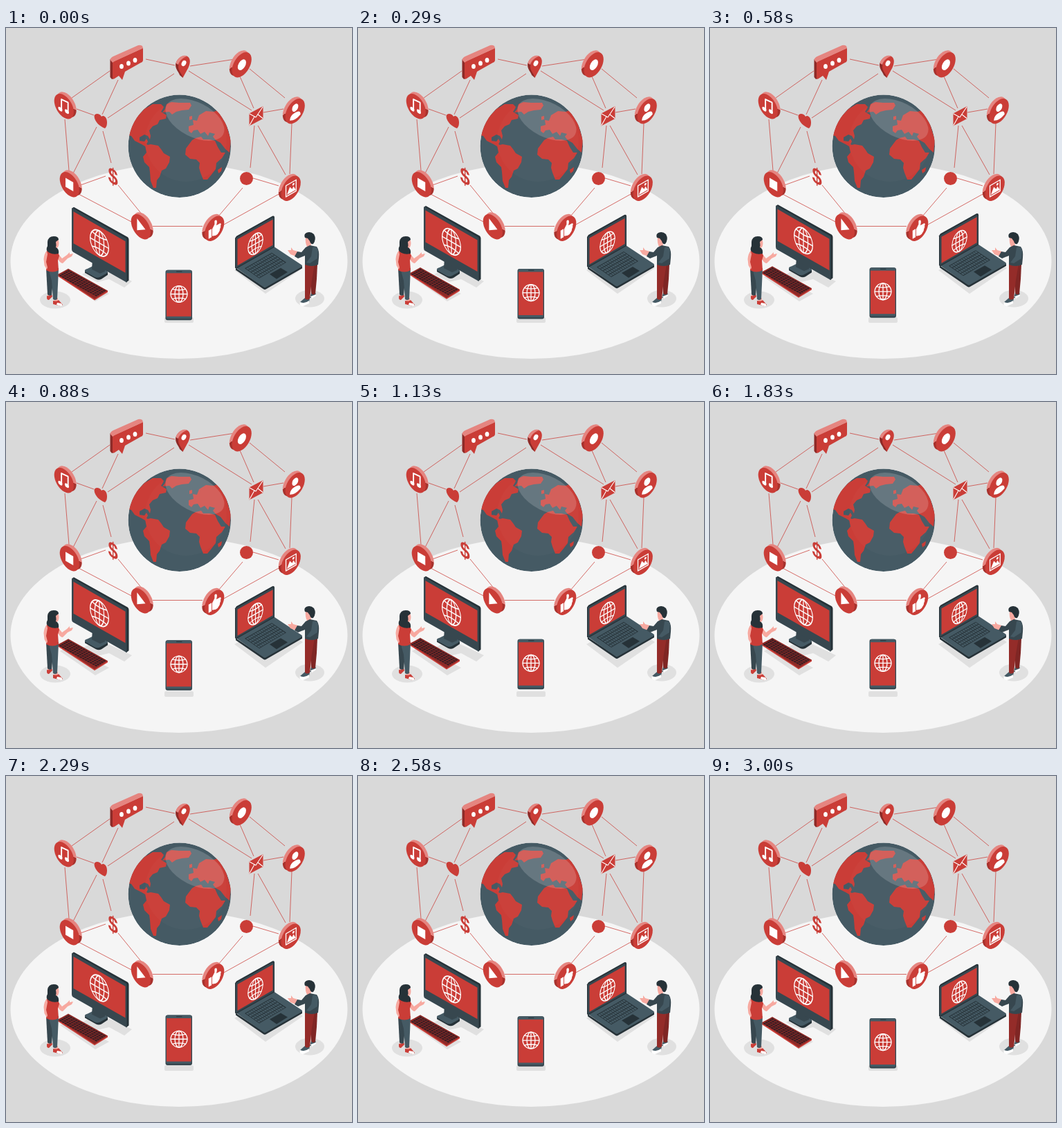
Write an HTML page that moves like this. It is 500 px wide and 500 px high and loops after 3.04 s.

```html
<!DOCTYPE html>
<html lang="en">
<head>
<meta charset="utf-8">
<title>Connected devices</title>
<style>
  html, body { margin: 0; width: 100%; height: 100%; overflow: hidden; background: #d9d9d9; }
  svg { display: block; width: 100vw; height: 100vh; }
  .red { fill: #ca3d37; }
  .deep { fill: #8e2a27; }
  .slate { fill: #455a64; }
  .dark { fill: #37474f; }
  .ink { fill: #263238; }
  .skin { fill: #f7a9a0; }
  .shade { fill: #e0e0e0; }
  .white { fill: #fff; }
  .line { fill: none; stroke: #fff; stroke-linecap: round; stroke-linejoin: round; }
</style>
</head>
<body>
<svg viewBox="0 0 500 500" xmlns="http://www.w3.org/2000/svg">
  <defs>
    <linearGradient id="rim" x1="0" y1="0" x2="0" y2="1">
      <stop offset=".5" stop-color="#e58580"/>
      <stop offset=".5" stop-color="#a8322d"/>
    </linearGradient>
    <clipPath id="ball"><circle cx="250.800" cy="170.700" r="74.200"/></clipPath>
    <g id="web" class="line">
      <circle r="10"/>
      <ellipse rx="5" ry="10"/>
      <path d="M0-10V10M-10 0H10M-8-6Q0-3.600 8-6M-8 6Q0 3.600 8 6"/>
    </g>
  </defs>

  <rect width="500" height="500" fill="#d9d9d9"/>
  <ellipse cx="250" cy="337" rx="243.500" ry="141" fill="#f5f5f5"/>

  <path fill="none" stroke="#ca3d37" stroke-width=".75" d="M202 45 244 54M266 55 331 45M264 62 355 119M243 66 147 130
    M150 62 95 101M162 75 139 125M102 117 127 126M85 132 91 206M131 143 97 210M140 149 152 195M105 228 144 214
    M103 239 183 281M162 227 197 270M212 286.500H284M307 272 342 231M315 284 396 239M357 217 394 228M353 202 359 141
    M364 141 404 212M372 122 401 117M338 70 358 116M352 59 403 101M413 138 410 211"/>

  <!-- earth -->
  <g clip-path="url(#ball)">
    <circle cx="250.800" cy="170.700" r="74.200" class="slate"/>
    <g class="red">
      <path d="M176 155 186 132 200 117 212 110 224 110 228 114 226 118 224 121 232 126 231 131 222 133 219 139 212 142 207 148 209 156 208 161
        205 156 200 154 193 158 193 163 200 164 203 160 205 164 203 168 209 171 206 174 196 168 186 163 181 156Z"/>
      <path d="M232 110 239 107 250 108 266 108 268 112 264 118 254 119 246 121 240 125 236 121 226 122 230 117Z"/>
      <path d="M201 170 209 168 220 170 224 175 228 181 237 186 236 194 231 203 225 206 222 215 218 220 217 231 213 231
        209 221 208 208 207 201 200 194 198 186 203 180Z"/>
      <path d="M264 149 264 142 271 140 270 133 276 134 279 126 289 120 300 121 306 119 318 139 325 162 323 180 317 175 310 166
        303 162 299 157 302 153 294 151 292 156 287 150 281 153 277 147 271 148 268 152Z"/>
      <path d="M269 162 274 159 282 157 285 161 294 161 302 163 306 172 311 180 317 180 312 188 304 195 303 204 296 213
        291 219 285 219 281 209 279 202 280 195 275 190 266 189 259 183 260 174Z"/>
      <path d="M306 205 312 201 311 207 307 210Z"/>
      <path d="M265 128 269 127 269 132 265 133Z"/>
    </g>
    <circle cx="260" cy="163" r="59" fill="#fff" opacity=".02"/>
    <ellipse cx="273" cy="132.500" rx="46" ry="25" transform="rotate(27 273 132.500)" fill="#fff" opacity=".16"/>
  </g>

  <!-- speech bubble -->
  <path class="deep" d="M150.500 45 154 49 156 73 153 74 150.500 71Z"/>
  <path class="red" d="M154 49 198 29V46Q198 49 195 50L172 63 168 75 163 69 157 73Q154 75 154 71Z"/>
  <path fill="#e58580" d="M150.500 46Q151 43 155 41L191 25Q194 24 197 26L198 29 157 48 154 50Z"/>
  <g class="white"><ellipse cx="167" cy="55.500" rx="2.900" ry="3.500"/><ellipse cx="177" cy="51" rx="2.900" ry="3.500"/><ellipse cx="186.500" cy="46.500" rx="2.900" ry="3.500"/></g>

  <!-- pin -->
  <path class="deep" d="M255.500 72 251 68C250 64 245 60 245 53 246 45 255 38 262 41Z"/>
  <path class="red" d="M255.500 72C255 66 249 63 249 56 249 47 257 39 262 41 269 45 265 56 261 62Z"/>
  <path fill="#e58580" d="M245.500 51C247 44 256 37 262 41 256 42 251 47 249 53Z"/>
  <ellipse class="white" cx="257" cy="51" rx="3.200" ry="4.300" transform="rotate(25 257 51)"/>

  <!-- heart, envelope, dollar, round badge -->
  <path class="red" d="M127.500 127C129 122 136 124 138 128 141 125 146 129 146 136 146 141 145 143 143 145 137 143 127.500 136 127.500 127Z"/>
  <path class="red" d="M351.500 123.500 371.500 113V131L351.500 141.500Z"/>
  <path class="line" stroke-width="1.100" d="M352 124 361 129 371 114M352 140.500 359 128M371 130.500 364 125"/>
  <text transform="matrix(.8 .46 0 1 154.500 214.500)" y="11" text-anchor="middle" class="red" font-family="Liberation Sans, Arial, sans-serif" font-weight="700" font-size="32">$</text>
  <circle class="red" cx="347.500" cy="217.500" r="9.500"/>

  <g id="discs"></g>

  <!-- ground shadows -->
  <g class="shade">
    <path d="M78 360 90 353 149 384 129 395Z"/>
    <path d="M110 356 133 343 182 366 171 375 149 363 132 367Z"/>
    <path d="M330 350 388 319 429 347 375 384Z"/>
    <rect x="229" y="418" width="42" height="8" rx="2"/>
    <ellipse cx="71" cy="393" rx="22" ry="12.500"/>
    <ellipse cx="439" cy="391" rx="21" ry="12.500"/>
  </g>

  <g id="devices">
    <!-- monitor -->
    <g transform="translate(0 2)">
      <path class="ink" d="M114 352 130 361Q134 363 138 361L147 355V351L114 349Z"/>
      <path class="slate" d="M114 350Q113 347 118 346L126 342 146 348Q148 351 145 353L136 358Q132 360 128 358Z"/>
      <path class="dark" d="M125 333 143 343V350L136 353 124 347Z"/>
    </g>
    <path class="ink" d="M95 261 98 259 176 302.500Q177.500 304 177.500 306V365L173.500 368 172 309Z"/>
    <path class="dark" d="M95 262Q95 259.500 97.500 261L173 304Q174.500 305 174.500 307V368L97 324Q95 323 95 320Z"/>
    <path class="red" d="M97.500 265.500 172.500 308.500V354L97.500 311.500Z"/>
    <use href="#web" transform="matrix(1.330 .770 0 1.760 135 311)" stroke-width=".95"/>

    <!-- keyboard -->
    <path class="red" d="M75 356 90 349 147 380V382L128 393.700 75 359Z"/>
    <path fill="#8e2a27" d="M75 356.500 90 348 147 380 128 392Z"/>
    <g id="keys" fill="#3a1d22"></g>

    <!-- laptop -->
    <path class="ink" d="M332 347 374 375 428 344V347.500L376 377.500Q374 379 372 377.500L332 350Z"/>
    <path class="slate" d="M332 346.500 387 316 427 342.500Q429 344 427 345.500L376 374.500Q374 376 372 374.500Z"/>
    <path class="ink" d="M345 347.500 384 325 405 339 366 362Z"/>
    <g id="laptopKeys" class="slate"></g>
    <path class="ink" d="M381 356 397 347 407 353 391 363Z"/>
    <path class="ink" d="M331 304 333 301 385 272Q388 271 388 274V317L333 348 331 347Z"/>
    <path class="dark" d="M332 304 384 274.500Q387 273 387 276V316L332 347Z"/>
    <path class="red" d="M334.500 305.500 385.500 277V314L334.500 343.500Z"/>
    <use href="#web" transform="matrix(1.070 -.610 0 1.440 360.500 312)" stroke-width="1.050"/>

    <!-- phone -->
    <rect class="dark" x="230.500" y="350" width="38.500" height="72.500" rx="3"/>
    <rect class="slate" x="231.500" y="350" width="36.500" height="70" rx="2.500"/>
    <rect class="red" x="232" y="354.500" width="35.500" height="62.500"/>
    <path class="line" style="stroke:#263238" d="M246.500 352.200H254"/>
    <use href="#web" transform="translate(250 384.700) scale(1.190)" stroke-width="1.100"/>
  </g>

  <!-- woman -->
  <path class="skin" d="M60 384 65 383 64 389 60 389ZM70 390 75 390 75 396 70 396ZM68 315 74 314 74 325 66 325Z"/>
  <path class="red" d="M59 387Q63 388 66 385L67 388 62 393Q59 393 59 390ZM68 394Q74 396 76 393L82 400Q80 403 76 401L68 399Z"/>
  <path class="white" d="M74 397 80 398Q83 402 79 402L73 400Z"/>
  <path class="dark" d="M58 347 67 348 68 365 66 386Q62 388 60 385Z"/>
  <path class="slate" d="M61 347 76 347Q75 371 74 392 71 394 68 392L66 365Z"/>
  <path class="skin" d="M72 322 81 333 88 328 92 324 92 327 97 326 95 330 89 333 82 340Q78 340 74 332Z"/>
  <path class="red" d="M57 325Q60 319 69 320 74 320 77 329L75 336 76 350Q67 355 58 350L58 338Z"/>
  <path class="skin" d="M59 322Q55 326 54.500 334L55.500 343 59 349 60 346 58 338 60 327ZM70 305 75 305Q78 311 75 317L69 317Z"/>
  <path class="ink" d="M60 309Q61 301 69 301 76 301 76 306L72 309Q73 314 72 317 77 319 76 326 69 328 63 325 56 322 60 315Z"/>

  <!-- man -->
  <path class="skin" d="M422 323 415 321 412 317 412 321 407 321 411 327 419 330ZM433 302 440 303 441 316 435 316Q432 310 433 302Z"/>
  <path class="slate" d="M441 383 447 382 448 386 443 390 439 390ZM432 390 439 390 438 396 431 399Q425 400 425 396Z"/>
  <path class="white" d="M425 396Q431 399 438 394L438 398 429 402Q423 401 425 396ZM440 388 448 385 448 387 442 391Z"/>
  <path fill="#7f2624" d="M439 341 450 341 449 363 447 384Q443 387 441 383Z"/>
  <path fill="#942c29" d="M432 341 446 341 442 364 439 391Q435 394 432 391Z"/>
  <path class="dark" d="M433 317 439 314 449 316Q453 321 452 332L451 342Q442 346 432 342L432 329 422 333 417 330 421 323 427 324Z"/>
  <path class="slate" d="M443 317Q450 315 451 322L450 333 439 340 434 339 441 330Z"/>
  <path class="ink" d="M432 303Q430 298 434 296 440 293 445 298 449 305 444 312 440 313 439 308L436 304Z"/>
</svg>
<script>
  const LOOP = 3040, LIFT = 9.5, LEAD = 35;
  const byId = id => document.getElementById(id);

  // side: 1 leans left, -1 leans right; glyphs lie in the plane of the disc
  const discs = [
    [85.5, 112, 1, '<path class="line" stroke-width="2.200" d="M-4 7V-8L7-9V5"/><ellipse class="white" cx="-6" cy="7" rx="3.500" ry="2.800"/><ellipse class="white" cx="5" cy="5" rx="3.500" ry="2.800"/>'],
    [339, 52, -1, '<circle class="white" r="7"/>'],
    [416, 119, -1, '<circle class="white" cy="-5" r="5.200"/><path class="white" d="M-9 9Q-9 2 0 2T9 9Q0 14-9 9Z"/>'],
    [93.5, 225, 1, '<rect class="white" x="-6.500" y="-6.500" width="13" height="13"/>'],
    [410, 230.5, -1, '<rect class="line" stroke-width="1.500" x="-8.500" y="-8" width="17" height="16"/><path class="white" d="M-7 6-2-3 2 2 4-1 8 6Z"/><circle class="white" cx="4" cy="-4" r="1.700"/>'],
    [196.5, 286, 1, '<path class="white" d="M-6-9V8L8 0Z"/>'],
    [299.5, 288.5, -1, '<path class="white" d="M-10-2H-5V10H-10ZM-4-1 0-6 0-11Q4-12 4-7L3-3H9Q12-2 10 1 11 3 9 5 9 8 7 9 6 11 2 11L-4 9Z"/>']
  ];
  byId('discs').innerHTML = discs.map(([x, y, side, glyph]) => {
    const plane = (dx, dy) => `matrix(.866 ${side * .5} 0 1 ${x + dx * side} ${y + dy})`;
    return `<circle r="16.500" fill="url(#rim)" transform="${plane(1.9, -1.2)}"/>
      <circle r="16.300" class="red" transform="${plane(-1.7, 1.2)}"/>
      <g transform="${plane(-1.9, 1.2)}">${glyph}</g>`;
  }).join('');

  // grid of keys on a parallelogram with edges u and v
  function keyGrid([ox, oy], [ux, uy], [vx, vy], cols, rows) {
    let d = '';
    const at = (a, b) => `${(ox + ux * a + vx * b).toFixed(2)} ${(oy + uy * a + vy * b).toFixed(2)}`;
    for (let r = 0; r < rows; r++) for (let c = 0; c < cols; c++) {
      const a0 = (c + .1) / cols, a1 = (c + .9) / cols, b0 = (r + .1) / rows, b1 = (r + .88) / rows;
      d += `M${at(a0, b0)} ${at(a1, b0)} ${at(a1, b1)} ${at(a0, b1)}Z`;
    }
    return `<path d="${d}"/>`;
  }
  byId('keys').innerHTML = keyGrid([90, 349.5], [55, 30.5], [-14.5, 8.5], 15, 5);
  byId('laptopKeys').innerHTML = keyGrid([346, 347.5], [38, -22], [20, 14], 13, 5);

  // the devices rise and sink at constant speed
  const devices = byId('devices');
  function render(now) {
    const phase = (now + LEAD) % LOOP / LOOP;
    const y = -LIFT * (1 - Math.abs(1 - 2 * phase));
    devices.setAttribute('transform', `translate(0 ${y.toFixed(3)})`);
  }
  const start = performance.now();
  function tick() {
    render(performance.now() - start);
    requestAnimationFrame(tick);
  }
  tick();
</script>
</body>
</html>
```
